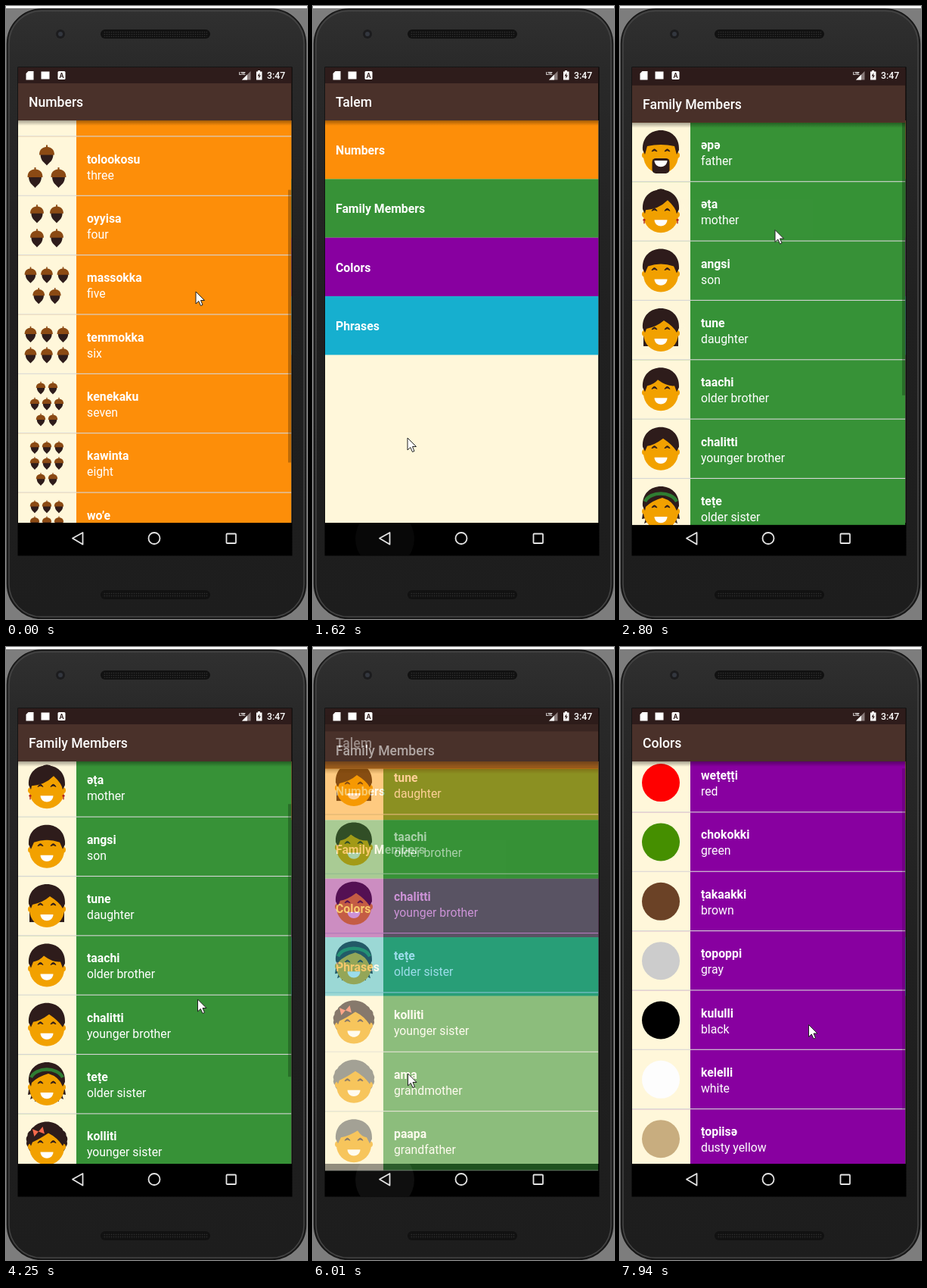
An HTML page for the animation above (8 s loop, 398 by 809 pixels).

```html
<!DOCTYPE html>
<html lang="en">
<head>
<meta charset="utf-8">
<title>Word list app</title>
<style>
html, body { margin: 0; width: 100%; height: 100%; overflow: hidden; background: #7d7d7d; }
svg { display: block; width: 398px; height: 809px; }
text { font-family: Roboto, "Noto Sans", sans-serif; fill: #fff; font-size: 15.8px; }
.bold { font-weight: 700; }
.title { font-weight: 500; font-size: 17.6px; }
</style>
</head>
<body>
<svg id="stage" viewBox="0 0 398 809" xmlns="http://www.w3.org/2000/svg"></svg>
<script>
const LOOP = 8000, ROW = 78.35, VIEW = 531, TOP = 151;
const CREAM = '#fff7da', DARK = '#2e1c1b', BAR = '#4a312a', SKIN = '#f2a100', GRAY = '#606262';

const rect = (x, y, w, h, fill, more = '') => `<rect x="${x}" y="${y}" width="${w}" height="${h}" fill="${fill}" ${more}/>`;
const circle = (x, y, r, fill, more = '') => `<circle cx="${x}" cy="${y}" r="${r}" fill="${fill}" ${more}/>`;
const path = (d, fill, more = '') => `<path d="${d}" fill="${fill}" ${more}/>`;
const text = (x, y, s, cls = '', more = '') => `<text x="${x}" y="${y}" class="${cls}" ${more}>${s}</text>`;
const group = (x, y, body, scale = 1) => `<g transform="translate(${x} ${y}) scale(${scale})">${body}</g>`;

// ---- row pictures, placed in a 77 px cell ----
const acorn = path('M-8.5-1H8.5C8.5 8 3 10 0 14C-3 10-8.5 8-8.5-1Z', DARK) +
  path('M-10 0C-10-8-5-10-1-10.5V-13H1V-10.5C5-10 10-8 10 0Z', '#8b4a14');

// counts per line, acorn scale, column pitch, first line y, line pitch
const acorns = (counts, scale, dx, y, dy) => counts.map((n, line) =>
  Array.from({ length: n }, (_, i) => group(38 + (i - (n - 1) / 2) * dx, y + line * dy, acorn, scale)).join('')).join('');

const ring = (n, rx, ry, from, to, r, fill) => Array.from({ length: n }, (_, i) => {
  const a = (from + (to - from) * i / (n - 1)) * Math.PI / 180;
  return circle((rx * Math.cos(a)).toFixed(1), (ry * Math.sin(a) - 4).toFixed(1), r, fill);
}).join('');

const dome = fringe => `M-24-3C-25-20-13-29 0-29S25-20 24-3L21 3${fringe}L-21 3Z`;
const eyes = path('M-12-1Q-8.500-7-5-1Q-8.500-3.500-12-1ZM5-1Q8.500-7 12-1Q8.500-3.500 5-1Z', DARK, `stroke="${DARK}" stroke-width="1"`);
const smile = path('M-8.500 11H8.500C8 22-8 22-8.500 11Z', '#fff');
const head = circle(0, 5, 23, SKIN) + circle(-21, 4, 4, SKIN) + circle(21, 4, 4, SKIN);

function face({ back = '', hair = '', fringe = '', color = DARK, front = '', beard = '' }) {
  const top = fringe ? path(dome(fringe), color) : '';
  return group(38, 39, back + head + top + hair + eyes + beard + smile + front);
}

const sideFringe = 'Q19-6 8-15Q-2-5-19-5';
const people = [
  face({ fringe: 'L18-8Q0-12-18-8', beard: rect(-11.5, 8, 23, 20, DARK, 'rx="5"') }),
  face({ back: circle(0, -20, 10, DARK), fringe: 'Q20-5 9-15Q-3-3-20-2',
    front: circle(-22, 11, 1.6, '#b3281d') + circle(22, 11, 1.6, '#b3281d') +
      rect(-22.7, 12, 1.4, 4, '#b3281d') + rect(21.3, 12, 1.4, 4, '#b3281d') }),
  face({ fringe: 'L17-6Q0-12-17-6' }),
  face({ back: rect(-23, -8, 46, 29, DARK), fringe: 'Q17-5 4-13Q-5-5-19-2' }),
  face({ fringe: 'L18-5Q8-4-4-13Q-9-7-18-5' }),
  face({ fringe: 'Q15-6 3-14Q-9-5-18-4' }),
  face({ back: path('M-22-5L-25 14L-20 13L-22 20L-16 17L-16 23L0 15L16 23L16 17L22 20L20 13L25 14L22-5Z', DARK),
    fringe: 'Q16-10 2-14Q-12-10-20-2',
    front: path('M-21-9C-14-23 14-23 21-9', 'none', 'stroke="#2f7d32" stroke-width="4.500"') }),
  face({ back: ring(14, 21, 17, 150, 390, 6.500, DARK), fringe: 'Q14-8 2-14Q-10-6-19-2',
    front: path('M-11-16L-18-21V-11ZM-11-16L-4-21V-11Z', '#f8694c', 'transform="rotate(-14 -11 -16)"') }),
  face({ back: ring(14, 21, 17, 150, 390, 6.500, GRAY), color: GRAY, fringe: 'Q14-7 2-14Q-10-6-19-2' }),
  face({ color: GRAY, fringe: 'L17-5Q10-6 5-14Q-6-7-17-5' })
];

const colorDot = fill => circle(38, 39, 25, fill);
const NINE = [0.62, 16, 18, 21];

const lists = {
  numbers: { title: 'Numbers', color: '#fd8e09', rows: [
    ['lutti', 'one', acorns([1], 1.4, 0, 38, 0)],
    ['otiiko', 'two', acorns([2], 1.1, 30, 38, 0)],
    ['tolookosu', 'three', acorns([1, 2], 1, 31, 24, 29.5)],
    ['oyyisa', 'four', acorns([2, 2], 0.9, 26, 23, 32)],
    ['massokka', 'five', acorns([3, 2], 0.79, 21.5, 25.5, 27.5)],
    ['temmokka', 'six', acorns([3, 3], 0.79, 21.5, 25.5, 27.5)],
    ['kenekaku', 'seven', acorns([2, 3, 2], ...NINE)],
    ['kawinta', 'eight', acorns([3, 3, 2], ...NINE)],
    ['wo’e', 'nine', acorns([3, 3, 3], ...NINE)],
    ['na’aacha', 'ten', acorns([3, 4, 3], 0.62, 15.5, 19, 20)]
  ] },
  family: { title: 'Family Members', color: '#379237', rows: [
    ['әpә', 'father'], ['әṭa', 'mother'], ['angsi', 'son'], ['tune', 'daughter'],
    ['taachi', 'older brother'], ['chalitti', 'younger brother'], ['teṭe', 'older sister'],
    ['kolliti', 'younger sister'], ['ama', 'grandmother'], ['paapa', 'grandfather']
  ].map((words, i) => [...words, people[i]]) },
  colors: { title: 'Colors', color: '#8800a0', rows: [
    ['weṭeṭṭi', 'red', '#f00'], ['chokokki', 'green', '#458f00'], ['ṭakaakki', 'brown', '#6b4226'],
    ['ṭopoppi', 'gray', '#ccc'], ['kululli', 'black', '#000'], ['kelelli', 'white', '#fdfdfd'],
    ['ṭopiisә', 'dusty yellow', '#c8ad7f'], ['chiwiiṭә', 'mustard yellow', '#e1ad01']
  ].map(([word, meaning, fill]) => [word, meaning, colorDot(fill)]) }
};

// ---- screens ----
const chrome = title => rect(16, 81, 362, 21, DARK) + rect(16, 682, 362, 43, '#000') +
  rect(16, TOP, 361.5, 7, 'url(#shade)') + rect(16, 102, 361.5, 49, BAR) + text(30, 133, title, 'title');

const listScreen = (id, { title, color, rows }) => `<g id="${id}">
  <g clip-path="url(#content)">${rect(16, TOP, 361.5, VIEW, color)}
    <g id="${id}-rows">${rows.map(([word, meaning, picture], i) => group(16, TOP + i * ROW,
      rect(0, 0, 77, ROW, CREAM) + picture + text(91, 35, word, 'bold') + text(91, 56, meaning) +
      rect(0, ROW - 1.1, 361.5, 1.1, '#d6d6d6'))).join('')}</g>
    ${rect(373, TOP, 4.5, VIEW * VIEW / (rows.length * ROW), '#000', `id="${id}-thumb"`)}
  </g>${chrome(title)}</g>`;

const menu = rect(16, TOP, 361.5, VIEW, CREAM) +
  [['Numbers', '#fd8e09'], ['Family Members', '#379237'], ['Colors', '#8800a0'], ['Phrases', '#16afcf']]
    .map(([name, fill], i) => rect(16, TOP + i * 77.35, 361.5, 77.4, fill) +
      text(30, TOP + 45 + i * 77.35, name, 'bold')).join('') + chrome('Talem');

const speaker = y => rect(125, y, 145, 12, '#111', 'rx="6"') + rect(128, y + 2, 139, 8, 'url(#mesh)', 'rx="4"');

const phone = rect(0, 0, 398, 809, '#7d7d7d') + rect(0, 0, 398, 3, '#fbfbfb') +
  rect(1.5, 4, 395, 804.5, 'url(#body)', 'rx="46" stroke="#151515" stroke-width="1.500"') +
  rect(4, 6.5, 390, 799.5, 'none', 'rx="43" stroke="#444" stroke-width="1.500"') +
  circle(72, 37, 6, '#1c1c1e') + circle(72, 37, 3, '#33373f') + speaker(31) + speaker(771) +
  rect(15.5, 80.5, 363, 645, '#000');

const statusIcons = path('M29.500 86H36.500V97.500H26.500V89Z', '#fff') + rect(46.5, 86.5, 11, 10, '#fff') +
  rect(68.5, 86, 10, 11, '#fff', 'rx="1.500"') + text(73.5, 95, 'A', 'bold', `text-anchor="middle" style="font-size:9px;fill:${DARK}"`) +
  text(308, 91, 'LTE', 'bold', 'style="font-size:6px;letter-spacing:-.5px"') +
  path('M323.500 86V97.500H312Z', '#8a7d7c') + path('M319 90.500V97.500H312Z', '#fff') +
  path('M331 86.500H333V85H336V86.500H338.500V97.500H331Z', '#fff') + path('M335.500 88L332.500 92.500H334.500L334 96L337 91.500H335Z', DARK) +
  text(345, 95.8, '3:47', '', 'style="font-size:12.3px;font-weight:500"');

const navIcons = `<g fill="none" stroke="#e4e4e4" stroke-width="1.800" stroke-linejoin="round">
  <path d="M88 702.500L101.500 695V710.500Z"/><circle cx="196" cy="702.500" r="7.500"/>
  <rect x="291.500" y="696.500" width="12.500" height="12.500" rx="1"/></g>`;

const stage = document.getElementById('stage');
stage.innerHTML = `<defs>
  <linearGradient id="body" x1="0" y1="0" x2="0" y2="1"><stop offset="0" stop-color="#303030"/>
    <stop offset=".1" stop-color="#292929"/><stop offset=".5" stop-color="#202020"/><stop offset="1" stop-color="#1d1d1d"/></linearGradient>
  <linearGradient id="shade" x1="0" y1="0" x2="0" y2="1"><stop offset="0" stop-opacity=".35"/><stop offset="1" stop-opacity="0"/></linearGradient>
  <pattern id="mesh" width="3" height="3" patternUnits="userSpaceOnUse"><circle cx="1.500" cy="1.500" r=".8" fill="#303030"/></pattern>
  <clipPath id="screen"><rect x="16" y="81" width="361.500" height="644"/></clipPath>
  <clipPath id="content"><rect x="16" y="151" width="361.500" height="531"/></clipPath>
  <clipPath id="nav"><rect x="16" y="682" width="361.500" height="43"/></clipPath></defs>
  ${phone}<g clip-path="url(#screen)">${menu}${Object.entries(lists).map(([id, l]) => listScreen(id, l)).join('')}</g>
  <g clip-path="url(#nav)">${rect(56, 664, 78, 78, '#fff', 'rx="39" id="ripple"')}</g>
  ${statusIcons}${navIcons}
  ${path('M0 0V16L3.800 12.500L6.500 18.500L9 17.400L6.500 11.500H11.500Z', '#fff', 'id="cursor" stroke="#222" stroke-width="1"')}`;

// ---- timing ----
const clamp = v => Math.min(1, Math.max(0, v));
const el = id => document.getElementById(id);

// Keys are [time, value, ...]; values between keys are linear.
function track(keys, t) {
  const next = keys.findIndex(k => k[0] > t);
  if (next < 0) return keys[keys.length - 1].slice(1);
  if (next === 0) return keys[0].slice(1);
  const a = keys[next - 1], b = keys[next], p = (t - a[0]) / (b[0] - a[0]);
  return a.slice(1).map((v, i) => v + (b[i + 1] - v) * p);
}

const refreshes = [[0, 130, 2], [280, 400, 2], [690, 690, 1], [840, 960, 2], [1110, 1230, 2], [1380, 2100, 7],
  [2250, 2380, 2], [2680, 2800, 2], [2950, 3190, 3], [3340, 3580, 3], [3740, 3740, 1], [3880, 4250, 4],
  [4400, 4520, 2], [4670, 4790, 2], [4940, 5300, 4], [5460, 5460, 1], [5610, 5740, 2], [5890, 6610, 7],
  [7040, 7160, 2], [7310, 7430, 2], [7580, 7940, 4]
].flatMap(([a, b, n]) => Array.from({ length: n }, (_, i) => n > 1 ? a + (b - a) * i / (n - 1) : a));

const cursorKeys = [[0, 251, 377], [130, 249, 330], [400, 240, 196], [690, 233, 335], [960, 188, 657], [1110, 140, 690],
  [1230, 106, 695], [1380, 106, 695], [1620, 125, 570], [1860, 165, 350], [2100, 182, 287], [2380, 201.5, 281],
  [2800, 205, 295.5], [3190, 228, 476], [3580, 252, 583], [3740, 254, 590], [4000, 254, 545], [4250, 253.5, 465],
  [4520, 251, 290], [4790, 248, 232], [4940, 240, 300], [5300, 132, 697], [5460, 103, 711], [5740, 102, 702],
  [6010, 125.5, 563], [6370, 180, 370], [6610, 212, 345], [7160, 221, 354], [7430, 232, 438], [7580, 246, 505], [7700, 250, 535], [7940, 249.5, 498.5]];

const rippleKeys = [[1230, 0], [1380, .14], [1500, .06], [1740, 0], [5460, 0], [5610, .06], [5740, .14], [6010, .06], [6250, 0]];

const windows = {
  numbers: { open: -1000, close: 1336,
    scroll: [[0, 135.2], [130, 165], [280, 235], [400, 252.5]],
    thumb: [[0, .25], [400, .25], [690, .2], [960, 0]] },
  family: { open: 2647, close: 5846,
    scroll: [[3740, 0], [3880, 3], [4000, 17], [4250, 83], [4400, 165], [4520, 218], [4670, 245], [4790, 252.5]],
    thumb: [[2800, .25], [3190, 0], [3740, 0], [3880, .25], [4940, .25], [5300, 0]] },
  colors: { open: 6457, close: 9e9,
    scroll: [[7430, 0], [7700, 1], [7940, 10.9]],
    thumb: [[7040, .25], [7160, 0], [7430, 0], [7580, .1], [7940, .16]] }
};

const SLIDE = 51.5; // 8% of the screen height

function drawWindow(id, t) {
  const { open, close, scroll, thumb } = windows[id];
  const opened = t - open, closed = t - close;
  const alpha = (1 - (1 - clamp(opened / 200)) ** 4) * (1 - clamp((closed - 100) / 150));
  const shift = SLIDE * ((1 - clamp(opened / 350)) ** 5 + clamp(closed / 250) ** 4);
  const node = el(id);
  node.style.display = alpha > 0 ? '' : 'none';
  node.setAttribute('opacity', alpha);
  node.setAttribute('transform', `translate(0 ${shift.toFixed(2)})`);

  const [y] = track(scroll, t), total = lists[id].rows.length * ROW;
  el(id + '-rows').setAttribute('transform', `translate(0 ${-y})`);
  el(id + '-thumb').setAttribute('y', TOP + y / total * VIEW);
  el(id + '-thumb').setAttribute('opacity', track(thumb, t)[0]);
}

function draw(now) {
  const time = now % LOOP;
  const t = refreshes.filter(r => r <= time + .01).pop();
  Object.keys(windows).forEach(id => drawWindow(id, t));
  el('ripple').setAttribute('opacity', track(rippleKeys, t)[0]);
  el('cursor').setAttribute('transform', `translate(${track(cursorKeys, t).join(' ')})`);
}

const start = performance.now();
function tick() {
  draw(performance.now() - start);
  requestAnimationFrame(tick);
}
tick();
</script>
</body>
</html>
```
